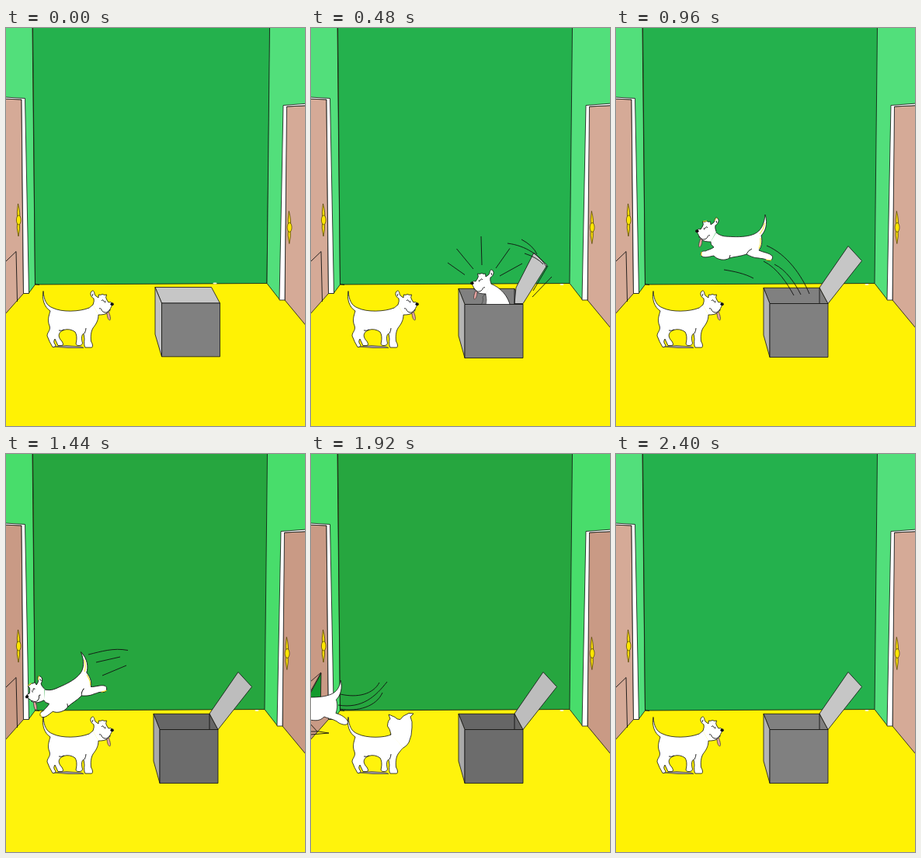
Write an HTML page that moves like this. It is 385 px wide and 512 px high and loops after 2.88 s.

```html
<!DOCTYPE html>
<html lang="en">
<head>
<meta charset="utf-8">
<title>Dog in a box</title>
<style>
html, body { margin: 0; width: 100%; height: 100%; overflow: hidden; background: #fff200; }
svg { display: block; width: 100vw; height: 100vh; }
</style>
</head>
<body>
<svg id="stage" viewBox="0 0 385 512" preserveAspectRatio="none"></svg>
<script>
const STEP = 480, COUNT = 6;
const stage = document.getElementById('stage');

const bright = { wall: '#24b14d', side: '#52df7b', door: '#d5aa97', floor: '#fff204', front: '#808080', inner: '#808080', left: '#b4b4b4', lid: '#c6c6c6' };
const dim = { wall: '#26a63f', side: '#48dd6b', door: '#c99a85', floor: '#fff30c', front: '#6c6c6c', inner: '#666', left: '#a9a9a9', lid: '#bdbdbd' };

const shape = (d, fill = 'none', stroke = '#111', w = 0.8) =>
  `<path d="${d}" fill="${fill}" stroke="${stroke}" stroke-width="${w}" stroke-linejoin="round"/>`;
const poly = (pts, fill, stroke) => shape(`M${pts}Z`, fill, stroke);
const lines = d => shape(d, 'none', '#111', 0.9);
const group = (transform, body) => `<g transform="${transform}">${body}</g>`;

function handle(x, y) {
  return shape(`M${x - .5} ${y - 21}Q${x + 3} ${y - 8} ${x + 1.2} ${y}Q${x + 2.5} ${y + 12} ${x} ${y + 21}Q${x - 3} ${y + 10} ${x - 1.2} ${y}Q${x - 2.5} ${y - 10} ${x - .5} ${y - 21}Z`, '#f5d90a', '#4a3d00', 0.7) +
    `<ellipse cx="${x + .3}" cy="${y}" rx="2.9" ry="6" fill="#ffe600" stroke="#4a3d00" stroke-width=".7"/>`;
}

function room(c, shift, flapOpen) {
  const flap = flapOpen
    ? poly('-1 308L13 282L12.5 313L-1 314', '#129a2c') + poly('-1 293L13 281L-1 306', c.door)
    : lines('M-1 301L13 287.5L14.5 352');
  return `<rect width="385" height="512" fill="${c.floor}"/>` +
    poly('-1 -1L34 -1L37.5 330L29 341.5L-1 341', c.side) +
    poly('34.5 -1H340L336 328.5L37.5 330', c.wall) +
    poly('-1 91L20 92L22.5 341.5L-1 368', c.door) +
    poly('-1 89L24.5 90.5L29.5 341.5H22.5L20 92L-1 91.2', '#fff') +
    flap + handle(16, 247) +
    group(`translate(${shift} 0)`,
      poly('336.5 -1H400V349H349L333 328.5', c.side) +
      poly('358 101L400 99V403L356 350', c.door) +
      poly('354 99.5L400 96V99L358.5 101L356 350H349', '#fff') +
      handle(361.8, 256.5)) +
    lines('M37 329.5L43 330.4') +
    `<ellipse cx="${shift ? 269 : 323}" cy="${shift ? 328.6 : 330}" rx="2.6" ry="1" fill="#fff8d8"/>`;
}

function closedBox(c) {
  return poly('192 333.5H264.5L275.5 354H200.5', '#c6c6c6') +
    poly('192 333.5L200.5 354V422.8L192 394', '#c3c3c3') +
    poly('200.5 354H275.5V422.8H200.5', c.front);
}

function openBox(c, lid, inside = '') {
  return poly('190 334.3H262L273 354.5H198', c.inner) +
    poly(lid, c.lid) + lines('M262 334.3V354.5') + inside +
    poly('190 334.3L198 354.5V423.5L190 395', c.left) +
    poly('198 354.5H273V423.5H198', c.front);
}

// Head in profile, looking right, nose at 137,356
const head =
  shape('M112 356Q114 351 113 348C109 346 107 340 111.5 338C114.5 338 113 343 116 345L119 347L119.5 343Q122 344 124 342.5Q127 344 129.5 343Q127.5 347 130 350L132 353Q135 352 136 353.5L136.5 357C135 360 133.5 361.5 134 363C132 368 125 369 119 369', '#fff') +
  shape('M130 366C130 370 131 375 133.5 376C135.5 375 134 369 132 365Z', '#e5a3a0', '#333', 0.7) +
  lines('M120 361Q121.5 360 122.5 361.5Q124 366.5 130 366L134 362M123 351Q125 348 126 352M127.5 351V353.5M112 342L111 345') +
  '<ellipse cx="136.6" cy="355.3" rx="2.2" ry="2" fill="#111"/>';

const flippedHead = (x, y) => group(`translate(${x} ${y}) scale(-1 1)`, head);

function standingDog(away) {
  const neck = away ? 'Q101 361 103 360' : 'Q106 361 112 356';
  const chest = away ? '119 378' : '119 369';
  const body =
    shape(`M${chest}C119 377 115 382 112 386C109 391 109 398 109.5 403Q113 409 110.5 411H102Q100 408 101 400L100 393C97 394 97 401 98.5 405Q98 409 93 408.5Q89 408 90.5 404Q92 396 89 391Q82 386 74 388.5C66 392 67 398 72 403Q75 408 72 408.5H67L63 400Q60 404 64 408Q64 411 60 410.5Q56 404 53 396C53 391 58 389 56 383C53 376 55 371 57 364C49 359 46 348 48 338.5C49 350 52 357 60 360C72 366 95 365 ${away ? '103 361' : '107 360'}${neck}`, '#fff') +
    lines('M75 388Q72 390 68 389M101 393Q103 389 103 386');
  const back = shape('M103 361Q102 354 98.5 350Q99 342 102 341L100 335L108 338.5Q111 342 115 341.5Q119 336 122 335.5L126 333.5L132 334L128 338Q131 344 130 352Q130 362 126 371Q124 375 119 378', '#fff');
  const shade = shape('M61 410L78 408.5L97 410L100 411.5L80 411.5Z', '#9a93a0', '#333', 0.6);
  return shade + body + (away ? back : head);
}

const leapingDog =
  shape('M129 263C136 269 142 268 150 268.5C162 269 171 268 178 265C187 261 191 252 192 240C196 252 192 262 187 267C189 276 187 282 184 286C190 289 197 289 201 293C203 297 199 301 195 299C190 296 188 297 184 296C177 296 172 293 168 291C160 294 152 294 146 296C140 300 130 298 126 293C120 294 115 296 111 294C107 291 110 286 115 287C119 285 122 285 126 282Q121 278 122 275', '#fff') +
  flippedHead(241, -94) +
  shape('M191.5 251Q190 260 185 265M186 270Q187 279 184 284M193 298L200 299M110 288V293M127 248L130 244M112 249L117 248', 'none', '#f3e21a', 1) +
  lines('M146 296L147 292M168 291Q170 286 175 284');

const boxedDog =
  shape('M231 328C240 331 253 340 257 358H221Q226 350 225 341', '#fff') +
  shape('M224 341Q228 348 224 358H217Q223 351 221 345Z', '#808080', '#333', 0.6) +
  flippedHead(344, -28);

const leavingDog =
  shape('M-2 313C10 313 19 312 26 309C33 306 37 300 38 291C41 300 38 311 32.5 316C35 324 33 330 32 333.5C38 335 46 339 48 345.5C46 350 40 348 36 346C30 341 24 341 17 338C11 344 6 343 -2 342', '#fff') +
  lines('M-1 347L8 357M-1 357H10L23 359L-1 361');

const openLid = '262 334L299 280.5L316.5 299.5L273 354.5';

function scene(i) {
  const c = i === 3 || i === 4 ? dim : bright;
  let out = room(c, i ? 0 : 3, i === 4);
  if (i === 0) out += closedBox(c);
  else if (i === 1) {
    out += group('translate(0 1)', openBox(c, '262 353.5L264 333L287 288L304 304L273 353.5', boxedDog)) +
      lines('M176 302L198 317.5M187.5 284L209 310M219 268L220 305M256 283.5L238 309M272 303L243 319M253 277C277 280 295 293 303 307M271 272Q286 280 291 291M275 290Q291 295 299 304M310 320L285 346M305 306L286 338');
  } else out += openBox(c, openLid);

  if (i === 2) out += leapingDog +
    lines('M194 280C220 291 239 318 249 342M204 304C219 311 231 329 238 343M190 300C208 309 220 328 229 344M139 311C152 313 166 316 177 322');
  if (i === 3) out += group('translate(27 313) rotate(-26) translate(-104 -262)', leapingDog) +
    lines('M106 258C123 254 138 249 157 252.5M116 268L147 261M124 285L155 272');
  if (i === 4) out += leavingDog +
    lines('M38 309C60 314 80 309 88 294M35 323C66 328 83 312 98 293M37 328C60 332 84 325 92 307');
  return out + standingDog(i === 4);
}

let shown = -1;
const start = performance.now();
function draw(now) {
  const i = Math.floor(Math.max(0, now - start) / STEP) % COUNT;
  if (i !== shown) stage.innerHTML = scene(shown = i);
  requestAnimationFrame(draw);
}
draw(start);
</script>
</body>
</html>
```
